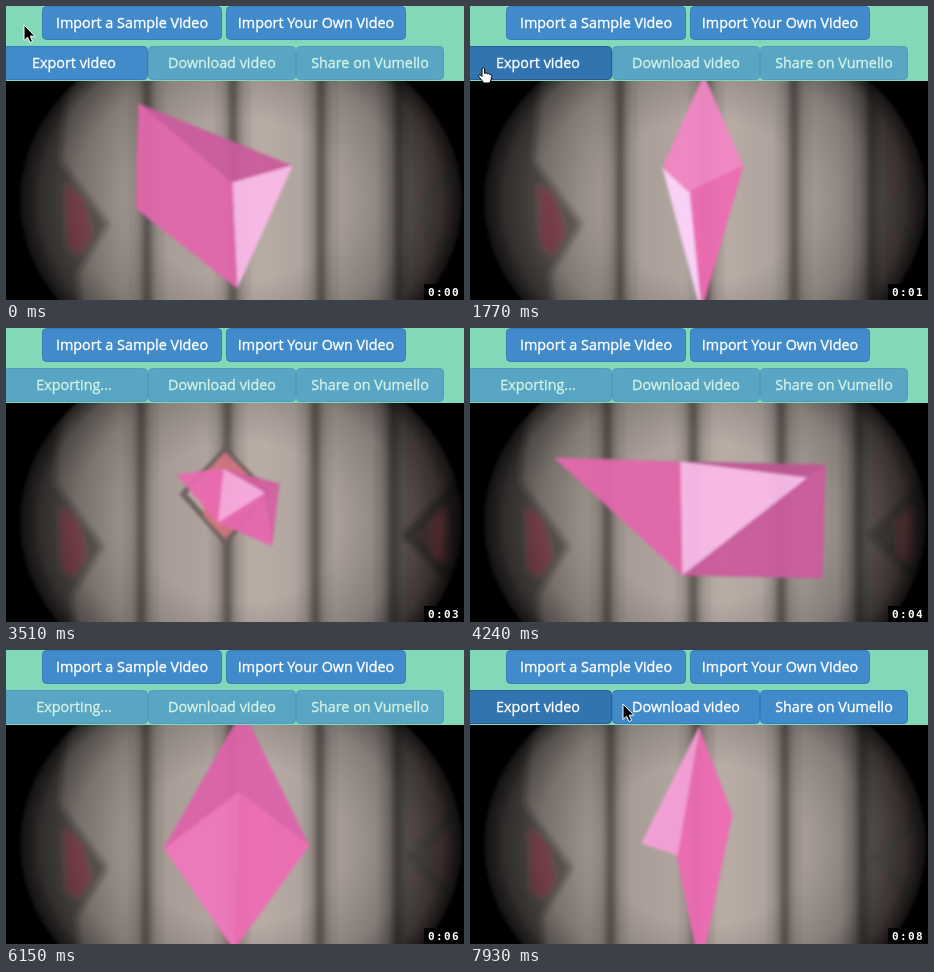
Write an HTML page that moves like this. It is 458 px wide and 294 px high and loops after 8 s.

```html
<!DOCTYPE html>
<html lang="en">
<head>
<meta charset="utf-8">
<title>Video export</title>
<style>
html, body { margin: 0; width: 100%; height: 100%; overflow: hidden; background: #82d9b7; }
svg { display: block; width: 458px; height: 294px; }
.btn rect { fill: #428bca; stroke: #357ebd; }
.btn text { font: 14.35px "Open Sans", sans-serif; fill: #fff; stroke: #fff; stroke-width: .35px; text-anchor: middle; }
.btn.active rect { fill: #3174b0; stroke: #285e8e; }
.btn.off { opacity: .65; }
#clock { font: bold 11px "DejaVu Sans Mono", monospace; letter-spacing: 1.4px; fill: #fff; }
</style>
</head>
<body>
<svg viewBox="0 0 458 294">
  <defs>
    <clipPath id="screen"><rect y="75" width="458" height="219"/></clipPath>
    <filter id="soft" x="-30%" y="-30%" width="160%" height="160%"><feGaussianBlur stdDeviation="3"/></filter>
    <filter id="edge" x="-20%" y="-20%" width="140%" height="140%"><feGaussianBlur stdDeviation="1.7"/></filter>
    <linearGradient id="wall" gradientUnits="userSpaceOnUse" x1="0" x2="458">
      <stop offset="0" stop-color="#6e6764"/>
      <stop offset=".24" stop-color="#a0968f"/>
      <stop offset=".56" stop-color="#b8aca5"/>
      <stop offset=".8" stop-color="#a19792"/>
      <stop offset="1" stop-color="#5e5855"/>
    </linearGradient>
    <radialGradient id="lens" gradientUnits="userSpaceOnUse" cx="0" cy="0" r="1" gradientTransform="translate(235 194) scale(223 180)">
      <stop offset=".45" stop-opacity="0"/>
      <stop offset=".75" stop-opacity=".18"/>
      <stop offset=".9" stop-opacity=".42"/>
      <stop offset=".98" stop-opacity=".74"/>
      <stop offset="1" stop-opacity="1"/>
    </radialGradient>
  </defs>
  <rect width="458" height="294" fill="#82d9b7"/>
  <g id="buttons"></g>
  <g clip-path="url(#screen)">
    <rect y="75" width="458" height="219" fill="url(#wall)"/>
    <g id="room">
      <g filter="url(#soft)">
        <g id="seams" stroke="#2e2927"></g>
        <path d="M-20 50H62L52 155L100 218L69 268L74 310H-20Z" fill="#191615" opacity=".42" stroke="#191615" stroke-width="4"/>
        <path d="M392 50H480V310H392Z" fill="#191615" opacity=".25"/>
        <path d="M60 178L77 194L85 228L74 248L62 240Z" fill="#8f4652" opacity=".9"/>
        <g id="niche">
          <path d="M470 142L406 207L470 272" fill="#211b1a" fill-opacity=".6" stroke="#252020" stroke-width="6"/>
          <path d="M445 178L430 195L432 227L447 236Z" fill="#8b3946"/>
        </g>
      </g>
      <g id="window" filter="url(#edge)">
        <path d="M225 122L267 166L225 213L183 166Z" fill="#b9aaa4" stroke="#6b615d" stroke-width="6"/>
        <path d="M204 146L225 124L246 145V189L225 211L204 189Z" fill="#d5707f" opacity=".9"/>
      </g>
    </g>
    <rect y="75" width="458" height="219" fill="url(#lens)"/>
    <g id="gem" filter="url(#edge)" stroke-width="1" opacity=".95"></g>
    <rect x="418" y="278" width="40" height="16"/>
    <text id="clock" x="422" y="290"></text>
  </g>
  <path id="arrow" d="M0 0V15.5L3.6 12.2L6 17.5L8.6 16.4L6.3 11.2H11Z" fill="#000" stroke="#fff"/>
  <path id="hand" d="M0 1C0-.8 2.4-.8 2.6 1V5.5C3.8 4.4 5 5 5.2 6C6.5 5 7.6 5.8 7.8 6.8C9.2 6.2 10 7 9.8 8.8L9 12L7.6 15H1.8L-3.4 8.2C-3.6 6.4-1.6 6.4 0 8.5Z" fill="#fff" stroke="#000"/>
</svg>
<script>
const LOOP = 8000, STEP = 146.85; // ms
const PRESS = 17, DONE = 43;      // steps at which the export begins and ends
const $ = id => document.getElementById(id);
const lerp = (a, b, k) => a + (b - a) * k;
const clamp = k => Math.max(0, Math.min(1, k));
const smooth = k => (k = clamp(k), k * k * (3 - 2 * k));

function add(parent, tag, attrs, text) {
  const el = document.createElementNS("http://www.w3.org/2000/svg", tag);
  for (const name in attrs) el.setAttribute(name, attrs[name]);
  if (text) el.textContent = text;
  parent.append(el);
  return el;
}

function button(x, y, w, label) {
  const g = add($("buttons"), "g", { class: "btn" });
  add(g, "rect", { x: x + .5, y: y + .5, width: w - 1, height: 33, rx: 4 });
  g.label = add(g, "text", { x: x + w / 2, y: y + 22 }, label);
  return g;
}
button(36, 0, 180, "Import a Sample Video");
button(220, 0, 180, "Import Your Own Video");
const exporter = button(-6, 40, 148, "Export video");
const outputs = [button(142, 40, 148, "Download video"), button(290, 40, 148, "Share on Vumello")];

// Each seam is a dark core in a wide shadow
for (const x of [141, 227, 315, 392]) {
  for (const [width, opacity] of [[30, .16], [9, .6]]) {
    add($("seams"), "path", { d: `M${x} 60V310`, "stroke-width": width, opacity });
  }
}

// Values at a step, eased between the surrounding keys
function track(keys, step, ease = clamp) {
  const last = keys.length - 1;
  const i = Math.max(0, Math.min(last - 1, keys.findIndex(k => k.at > step) < 0 ? last : keys.findIndex(k => k.at > step) - 1));
  const a = keys[i], b = keys[i + 1];
  const k = ease((step - a.at) / (b.at - a.at));
  return a.v.map((v, j) => lerp(v, b.v[j], k));
}
const key = (at, ...v) => ({ at, v });

// The gem: four rim corners, a ridge point and an outer tip, then a tone per face
const FACES = [[4, 0, 1], [4, 1, 2], [4, 2, 3], [4, 3, 0], [0, 3, 5]];
const poses = [
  key(0, 133,98, 286,160, 231,282, 131,203, 226,177, 131,150, 2, 8, 4, 4, 4),
  key(12, 234,70, 273,160, 231,305, 193,162, 219,186, 213,116, 6, 5, 9, 6, 6),
  key(28, 210,134, 355,137, 352,250, 212,247, 336,150, 85,130, 1, 2, 2, 8, 4),
  key(35, 238,40, 323,190, 223,275, 137,190, 232,150, 187,115, 3, 5, 6, 3, 3),
  key(46, 236,78, 286,200, 232,320, 176,205, 233,135, 206,141, 4, 5, 5, 4, 4),
  key(54, 229,78, 262,165, 230,320, 207,205, 228,165, 172,193, 5, 5, 5, 5, 7)
];
const facets = FACES.map(() => add($("gem"), "polygon", {}));

// Tone 0 is deep magenta, 5 hot pink, 9 near white
const DEEP = [180, 82, 140], HOT = [238, 108, 179], PALE = [252, 212, 249];
function tone(n) {
  const [a, b, k] = n < 5 ? [DEEP, HOT, n / 5] : [HOT, PALE, (n - 5) / 4];
  return `rgb(${a.map((c, i) => Math.round(lerp(c, b[i], k)))})`;
}

function drawGem(step) {
  const v = track(poses, step);
  // It recedes into the wall window while the export starts
  const size = smooth((Math.abs(step - 20) - 1) / 4);
  const corner = i => [lerp(217, v[2 * i], size), lerp(168, v[2 * i + 1], size)];
  facets.forEach((el, i) => {
    const fill = tone(v[12 + i]);
    el.setAttribute("points", FACES[i].map(corner).join(" "));
    el.setAttribute("fill", fill);
    el.setAttribute("stroke", fill);
  });
  $("gem").setAttribute("visibility", size ? "visible" : "hidden");
}

function drawRoom(step) {
  const fresh = step < PRESS ? 0 : Math.exp((19 - step) / 12);
  const drift = step < PRESS ? step * .75 : -8 * fresh;
  $("room").setAttribute("transform", `translate(${drift})`);
  $("niche").setAttribute("opacity", .12 + .75 * fresh);
  $("window").setAttribute("opacity", 1 - smooth((Math.abs(step - 20) - 2) / 6));
}

const pointer = [key(1, 18, 19), key(7, 12, 62), key(PRESS, 12, 62), key(PRESS + 1, -20, 62),
  key(DONE, -14, 58), key(46, 48, 36), key(48, 62, 42), key(53, 153, 54)];

function drawPointer(step) {
  const [x, y] = track(pointer, step, smooth);
  const pressing = step >= 6 && step <= PRESS;
  for (const [id, on] of [["hand", pressing], ["arrow", !pressing]]) {
    $(id).setAttribute("transform", `translate(${x} ${y})`);
    $(id).setAttribute("visibility", on ? "visible" : "hidden");
  }
}

function draw(t) {
  const step = Math.floor(t / STEP + .02);
  const done = step >= DONE, busy = step >= PRESS && !done;
  exporter.label.textContent = busy ? "Exporting..." : "Export video";
  exporter.setAttribute("class", busy ? "btn off" : step >= 6 ? "btn active" : "btn");
  for (const b of outputs) b.setAttribute("class", done ? "btn" : "btn off");
  drawRoom(step);
  drawGem(step);
  drawPointer(step);
  $("clock").textContent = "0:0" + Math.floor((t + 130) / 1000);
}

const start = performance.now();
function tick() {
  draw((performance.now() - start) % LOOP);
  requestAnimationFrame(tick);
}
tick();
</script>
</body>
</html>
```
